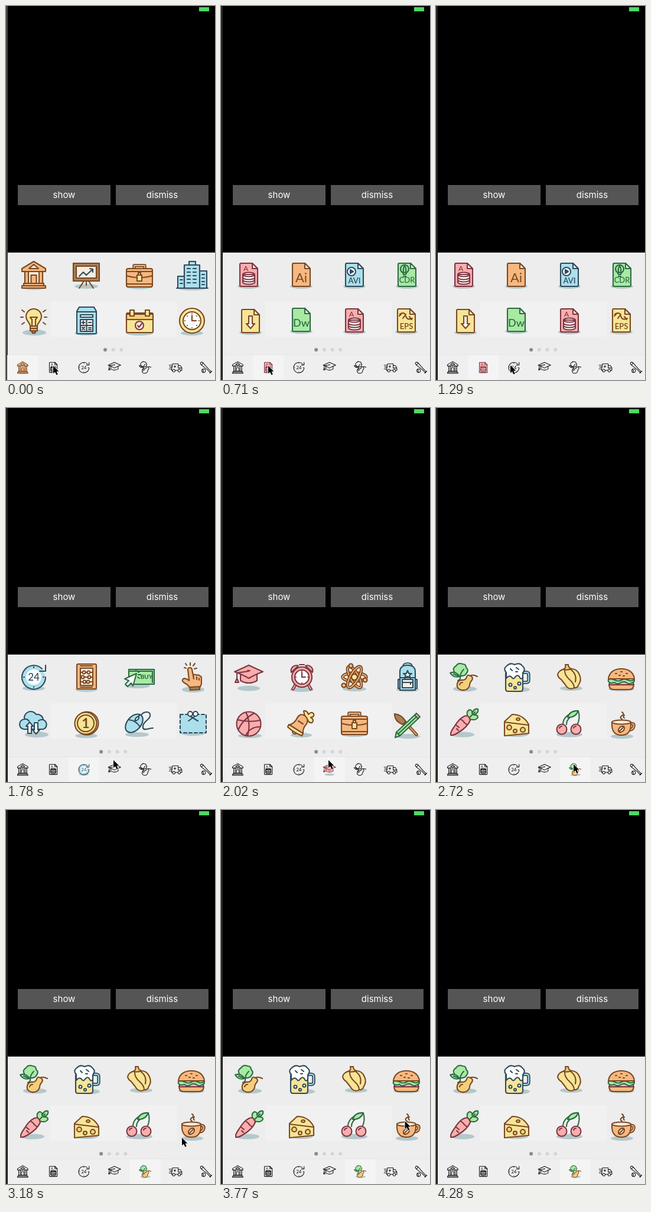
Animation of 354x631 px, one loop 4760 ms. Source, as an HTML page with a canvas:

```html
<!DOCTYPE html>
<html lang="en">
<head>
<meta charset="utf-8">
<title>Icon keyboard</title>
<style>
html, body { margin: 0; width: 100%; height: 100%; overflow: hidden; background: #000; }
canvas { display: block; width: 354px; height: 631px; }
</style>
</head>
<body>
<canvas id="stage"></canvas>
<script>
const LOOP = 4760, W = 354, H = 631;
const canvas = document.getElementById('stage'), g = canvas.getContext('2d');
const dpr = window.devicePixelRatio || 1;
canvas.width = W * dpr;
canvas.height = H * dpr;

const colors = {
  O: '#f6b880', Y: '#f6e596', A: '#abdfeb', R: '#f8aeac', E: '#a8eaa2', W: '#fdfdfd', L: '#f7ece0',
  T: '#a98058', G: '#f3cf7c', B: '#7a4822', N: '#2f4a5c', P: '#7c3542', D: '#2d6a45', K: '#111'
};

// Path helpers: ellipse, tilted ellipse, box
const oval = (x, y, r, q = r) => `M${x - r} ${y}a${r} ${q} 0 1 0 ${2 * r} 0a${r} ${q} 0 1 0 ${-2 * r} 0Z`;
const tilt = (x, y, r, q, deg) => {
  const a = deg * Math.PI / 180, u = r * Math.cos(a), v = r * Math.sin(a);
  return `M${x + u} ${y + v}A${r} ${q} ${deg} 1 0 ${x - u} ${y - v}A${r} ${q} ${deg} 1 0 ${x + u} ${y + v}Z`;
};
const box = (x, y, w, h) => `M${x} ${y}h${w}v${h}h${-w}Z`;

// An icon is [shadow, style, path, style, path, ...].
// Style: fill letter, stroke letter, optional mode (~ tube, . dashed, t text).
const page = 'M-13-20H6L15-11V17q0 2-2 2H-13q-2 0-2-2V-18q0-2 2-2Z';
const file = (fill, ink, ...parts) =>
  [[0, 19, 19, 4], fill + ink, page, 'L' + ink, 'M6-20V-11H15Z', ...parts];
const shift = (icon, dx, dy) => Object.assign([...icon], { dx, dy });

const database = file('R', 'P', '_Pt', ['A', -5, -7, 12, 500],
  'WP', 'M-10-1V12a10 3.5 0 0 0 20 0V-1Z' + oval(0, -1, 10, 3.5),
  '_P', 'M-10 4a10 3.5 0 0 0 20 0M-10 8a10 3.5 0 0 0 20 0');

const briefcase = [[0, 20, 22, 4],
  'OB~', 'M-9-10V-16H9V-10',
  'OB', 'M-19-11H19q3 0 3 3V17q0 3-3 3H-19q-3 0-3-3V-8q0-3 3-3Z',
  '_B', 'M-22-6H22M-22 1Q-12 4-4 4M22 1Q12 4 4 4M-22 15H22',
  'YB', box(-4, 0, 8, 10) + 'M-2 0V-4H2V0'];

const pages = [
  [
    [[0, 21, 20, 4],
      'LB', box(-15, -6, 30, 20), 'OB', box(-15, -6, 6, 20) + box(9, -6, 6, 20),
      'OB', box(-4.5, 0, 9, 14), 'OB', 'M0-23L-20-11V-6H20V-11Z', 'LB', 'M0-18L-8-11H8Z',
      'OB', box(-17, 14, 34, 4) + box(-20, 18, 40, 4)],
    [[0, 19, 20, 4],
      '_B', 'M-4 10L-12 22M4 10L12 22M0 10V17', 'TB', box(-22, -20, 44, 30), 'LB', box(-17, -15, 34, 20),
      '_N', 'M-12 2L-5-5L0 0L11-10M6-11L11-10V-5'],
    briefcase,
    [[0, 22, 25, 4],
      'AN', box(-24, 2, 11, 20) + box(13, -7, 12, 29), 'AN', box(-5, -23, 11, 6),
      'AN', box(-13, -17, 26, 39),
      '_N', [-11, -5, 1, 7, 13].map(y => `M-8 ${y}h5m5 0h5`).join('') +
        'M-20 8h4m-4 6h4M17-1h4m-4 6h4m-4 6h4m-4 5h4M-26 22H27'],
    [[1, 20, 20, 5],
      'YB', 'M-6 9C-6 4-13 0-13-7A13 13 0 0 1 13-7C13 0 6 4 6 9Z', 'OB', 'M-6 9H6V17H-6ZM-6 13H6',
      'TB', 'M-4 17h8l-2 4h-4Z', '_B', 'M-3 9V-2l-3-4h12l-3 4V9',
      '_B', 'M-22-6h4M18-6h4M-20-18l4 3M20-18l-4 3M-20 6l4-3M20 6l-4-3'],
    [[0, 21, 20, 4],
      'AN', 'M-12-23H13L17-16V20q0 2-2 2H-14q-2 0-2-2V-16Z', '_N', 'M-16-15H17', 'WN', box(-10, -10, 21, 4),
      'LN', box(-10, -2, 21, 20),
      '_N', 'M.5-2V18M-10 8H11M-7.500 3h5M-5 .5v5M4 3h4M-7 11l4 4m0-4l-4 4M4 12h4m-4 3h4'],
    [[0, 21, 23, 4],
      'YB', 'M-20-13H21q2 0 2 2V18q0 2-2 2H-20q-2 0-2-2V-11q0-2 2-2Z', 'GB', box(-22, -11, 45, 9),
      'YB', box(-16, -18, 7, 10) + box(10, -18, 7, 10), 'LP', oval(0, 8, 7), '_P', 'M-3 8l2 3 5-6'],
    [[0, 21, 19, 4],
      'YB', oval(0, 0, 21), 'WB', oval(0, 0, 15),
      '_B', 'M0-9V0H7M0-12v0M12 0v0M0 12v0M-12 0v0M8-8v0M8 8v0M-8 8v0M-8-8v0']
  ],
  [
    database,
    file('O', 'B', '_Bt', ['Ai', 0, 12, 22, 400]),
    file('A', 'N', 'WN', oval(-5, -6, 7), 'NN', 'M-7-9l5 3-5 3Z', '_Nt', ['AVI', 0, 14, 13, 600]),
    file('E', 'D', 'ED', 'M-7-4A7 7 0 1 1-1-4L-2-1H-6Z', '_D', 'M-4-16Q-8-9-5-4M-4-16Q0-9-3-4M-6 2H-2',
      '_Dt', ['CDR', 0, 13, 13, 500]),
    shift(file('Y', 'B', 'WB', 'M-3-9H3V4H7L0 12L-7 4H-3Z'), 3, 1),
    shift(file('E', 'D', '_Dt', ['Dw', 0, 11, 18, 500]), 0, -1),
    database,
    shift(file('Y', 'B', '_B', 'M-11-11Q-3-16-1-8T10-4M-12-8l4-4M-1-11l-5 7M5-7l4 5', '_Bt', ['EPS', 0, 14, 13, 600]), -1, 0)
  ],
  [
    [[0, 19, 19, 4],
      'AN', 'M20 0A20 20 0 1 1 14-14', 'W_', oval(0, 0, 13), '_N', 'M20-20V-10H10M0-17v1M0 16v1M-17 0h1M16 0h1',
      '_Nt', ['24', 0, 6, 17, 500]],
    [[0, 21, 19, 4],
      'OB', 'M-14-22H15q2 0 2 2V18q0 2-2 2H-14q-2 0-2-2V-20q0-2 2-2Z', 'LB', box(-10, -15, 21, 29),
      '_B', 'M-10-8H11M-10 0H11M-10 8H11M-10-19H10M-10 17H10',
      'LB', oval(-4, -8, 2.5) + oval(4, -8, 2.5) + oval(-6, 0, 2.5) + oval(5, 0, 2.5) + oval(-3, 8, 2.5) + oval(3, 8, 2.5)],
    [[-3, 15, 21, 4],
      'ED', box(-18, -13, 43, 25), '_D', 'M-16-10H22V9',
      'WD', 'M-5-6L-25 3L-18 6L-24 12L-20 16L-14 10L-11 15Z',
      '_D', 'M-5-10l-1-1M-2-8l3-2M-2-4h4M-3 0l3 2', '_Dt', ['BUY', 12, 3, 10, 800]],
    [[2, 21, 19, 5],
      '_B', 'M-10-15l-3-1M-9-20l-2-3M-3-20v-4M2-19l3-4M4-14l4-1',
      'OB', 'M-5 4L-7-12a3.500 3.500 0 0 1 7-1L2-3q3-3 6 0 3-2 5 1 3 0 3 4V11Q15 15 13 18H-3Q-8 12-14 9q-4-3-1-6 4-2 10 3Z',
      '_B', 'M2-3L3 3M8 0V4M12 2V5', 'TB', 'M-4 17L13 16V21L-3 22Z'],
    [[5, 20, 20, 5],
      'AN', 'M-15 11a8.500 8.500 0 0 1-1-17A11 11 0 0 1 4-14A10 10 0 0 1 16-5A8.500 8.500 0 0 1 16 11Z',
      '_N', 'M-16-6q5-1 8 3M15-5q-4-1-7 2',
      'WN', 'M-7-1l6 7h-3v12h-6V6h-3Z', 'WN', 'M4 19l-6-7h3V0h6v12h3Z'],
    [[0, 22, 19, 4],
      'OB', oval(1, 1, 19.500), 'YB', oval(-1, 1, 18.500), 'YB', oval(-1, 1, 14), '_Bt', ['1', -1, 9, 23, 700]],
    [[-4, 20, 20, 4],
      '_N', 'M3-13C8-20 20-20 18-11C16-4 4-1 6 9C8 14 16 9 23 9',
      'AN', tilt(-9, 1, 18, 11.5, -48), '_N', 'M-18-5Q-6-4 1 7M-8-3L1-14', 'WN', tilt(-4, -7, 4, 2, -48)],
    shift([[0, 18, 20, 4],
      'AN.', box(-22, -14, 44, 31), '_N', 'M-5-11L8-3M3-11L-8-3', 'WN', oval(-5, -15, 4) + oval(4, -15, 4)], 2, 0)
  ],
  [
    [[0, 19, 19, 4.5],
      'RP', 'M-14-5V6Q0 14 14 6V-5Z', 'RP', 'M0-20L24-9Q10-4 0 2Q-10-4-24-9Z',
      '_P', 'M0-10L-20-7V3M-2-11h4', 'RP', 'M-20 2l-3 7h6Z'],
    [[1, 21, 20, 4],
      'RP', 'M-17-8A9 9 0 0 1-5-19ZM19-8A9 9 0 0 0 7-19Z', 'RP~', 'M-10 13l-4 7M12 13l4 7',
      'RP', oval(1, 0, 17), 'WP', oval(1, 0, 12), '_P', 'M1-8V0H7M1-10v0M1 10v0M-9 0v0M11 0v0M-3-21H5'],
    [[0, 20, 20, 4],
      'OB~', tilt(0, 0, 20, 7, 0), 'OB~', tilt(0, 0, 20, 7, 60), 'OB~', tilt(0, 0, 20, 7, 120),
      'YB', oval(0, 0, 5), 'OB', oval(-6, -19, 3.5) + oval(18, 5, 3.5) + oval(-18, 14, 3.5)],
    [[1, 21, 19, 4],
      'AN~', 'M-5-18q0-4 6-4t6 4', 'AN', box(-15, 4, 32, 15),
      'AN', 'M-12 22V-9Q-12-20 1-20T14-9V22Z', 'LN', 'M-8 4H10V18H-8Z', '_N', 'M-12 1H14M-8 9H10M6 9v3',
      'WN', 'M1-11l2 5h5l-4 3 2 5-5-3-5 3 2-5-4-3h5Z'],
    [[2, 22, 20, 4],
      'RP', oval(0, 2, 20.500), '_P', 'M-19-5Q0 0 19-4M-5-18Q4 0-2 22M-18 12Q-10-6 9-16M-5 21Q3 6 20 7'],
    [[0, 21, 18, 4],
      'YB', 'M6-10L4-20Q10-21 12-14Q18-20 21-15Q23-10 16-9Q23-5 18 0Q13 1 10-6Z',
      'GB', oval(-11, 15, 4), 'OB', 'M-21 4Q-11 1-7-8Q-2-17 6-12Q13-6 9 2Q2 9 3 18Q-2 22-13 13T-21 4Z',
      'YB', 'M-21 3L3 18L1 22Q-14 16-23 7Z', '_B', 'M-5-3L3 2'],
    briefcase,
    [[2, 23, 20, 4],
      'OB~', 'M16 20L-4-2', 'TB', 'M-7 3Q-21-2-21-15Q-9-14-2-2Z',
      'ED', 'M13-13l6 6L-12 22L-20 25L-18 16Z', '_D', 'M16-10L-15 19M-18 16l6 6', 'RD', 'M13-13l3-3 6 6-3 3Z']
  ],
  [
    [[2, 20, 20, 4.500],
      'ED', 'M-6-2Q-17-2-16-9Q-20-15-13-19Q-9-25-2-22Q4-22 4-16Q9-12 5-7Q2-1-6-2Z',
      'ED', 'M-7-1Q-17 2-23-7Q-14-11-7-1Z', '_D', 'M0-13Q-6-7-6 0Q-5 4-10 6M-7-1L-17-5',
      'GB', 'M9-3Q17-1 14 5Q10 9 10 14Q7 23-3 22Q-13 20-11 11Q-9 4-1 5Q4 4 5 0Q6-4 9-3Z',
      '_B', 'M11-2Q15-5 23-1M-7 13q1-4 5-4'],
    [[3, 21, 20, 4.500],
      'AN~', 'M11-8H17q4 0 4 4V5q0 4-4 4H11', 'YN', 'M-18-7H11V20q0 4-4 4H-14q-4 0-4-4Z',
      'WN', 'M-17 2V-8Q-23-14-16-19Q-10-25-3-21Q6-25 10-19Q17-14 11-7V1Q7 5 5-1Q2-5-2 0Q-5 5-8 0Q-12-4-17 2Z',
      '_N', 'M-10-14l3 3M0-16l4 3M-1-9h3', 'WN', oval(-10, 13, 2.500) + oval(-2, 18, 2) + oval(5, 11, 2.500)],
    [[3, 19, 19, 4],
      'YB', 'M-8-14Q-19-11-20-4Q-19 1-14 4Q-9 10-4 17Q2 22 8 18Q14 19 16 12Q21 5 17-4Q13-14 3-14Q-2-17-8-14Z',
      '_B', 'M-8-11Q-8-3 0 4T8 18M2-13Q13-5 10 8', 'GB', 'M-10-13Q-5-16-7-21L-2-21Q-2-16 3-14Q-4-11-10-13Z'],
    shift([[0, 18, 22, 4],
      'OB', 'M-21 10H21Q21 19 13 19H-13Q-21 19-21 10Z', 'RP', 'M-20 6H20V11H-20Z',
      'ED', 'M-22 2Q-17 0-11 3T0 3T11 3T22 2Q23 7 17 8Q13 11 8 7Q3 4-2 8Q-7 11-12 7Q-17 9-20 7Q-23 6-22 2Z',
      'OB', 'M-22 1C-21-10-12-16 0-16S21-10 22 1Z', '_B', 'M-10-8h2M-1-11h2M8-8h2M-4-5h2M3-4h2'], -1, 2),
    [[-2, 20, 20, 4.500],
      'ED', 'M7-10Q3-19 10-22Q15-21 14-16Q18-25 24-23Q26-17 17-13Q24-14 24-9Q20-3 11-6Z', '_D', 'M9-8L19-18',
      'RP', 'M1-11Q9-14 11-4Q6 8-10 17Q-18 22-22 21Q-23 16-17 8Q-8-7 1-11Z',
      '_P', 'M-5-6l5 4M5 3l-5-4M-13 4l5 4M-9 13l-3-3'],
    [[0, 20, 20, 4],
      'YB', 'M-20-2L-7-14Q12-14 21 3V18L-20 22Z', '_B', 'M-20-1L21 4',
      'GB', oval(-12, 8, 4) + oval(-2, 14, 3) + oval(11, 12, 4) + oval(3, -6, 3, 2)],
    [[0, 20, 22, 4.500],
      '_D', 'M-11 3Q-11-14 15-20Q19-8 13 4M-5 3Q-5-9 11-14', 'ED', 'M15-20Q1-21-3-9Q10-8 15-20Z',
      'RP', oval(-13, 11, 8.500), 'RP', oval(11, 11, 8.500), '_P', 'M-17 9q1-3 4-3M7 9q1-3 4-3'],
    [[0, 23, 19, 4],
      '_B', 'M0-6Q-5-9 0-12T0-18M4-8Q1-10 4-13', 'OB~', 'M14 2Q21 0 20 6T11 12',
      'OB', 'M-17-1V5Q-16 21-1 21T15 5V-1Z', 'LB', oval(-1, -1, 16, 3.5),
      'LB', tilt(-1, 11, 6, 4, -45), '_B', 'M-4 14L2 8']
  ]
];

const ambulance = [null,
  'WK', 'M-12-14H10V-8H18L24 1V11H-16Z', '_K', 'M10-8V2H23M-25-9h10M-23-2h9M-25 5h9M-3-8v8M-7-4h8',
  'WK', oval(-7, 12, 5) + oval(14, 12, 5)];
const bat = [null,
  'WK', 'M-22-18q4-5 9-1L8 5L19 15l-4 4L5 9L-19-10q-5-4-3-8Z', '_K', 'M14 22L22 14M-12-17L-18-10', 'WK', oval(-10, 12, 7),
  '_K', 'M-14 8q5 3 2 10'];
const tabs = [...pages.map(p => p[0]), ambulance, bat];

function drawIcon(icon, x, y, scale = 1, mono = false) {
  const [shadow, ...parts] = icon;
  g.save();
  g.translate(x + (icon.dx || 0) * scale, y + (icon.dy || 0) * scale);
  g.scale(scale, scale);
  g.lineJoin = g.lineCap = 'round';
  if (shadow && !mono) {
    g.fillStyle = '#b4c8cb';
    g.fill(new Path2D(oval(...shadow)));
  }
  const width = scale < 1 ? 2.4 : 2.1;
  for (let i = 0; i < parts.length; i += 2) {
    const [f, s, mode] = parts[i], data = parts[i + 1];
    const fill = mono ? '#efefef' : colors[f], ink = mono ? '#111' : colors[s];
    if (mode === 't') {
      text(data[0], data[1], data[2], `${data[4]} ${data[3]}px Lato, sans-serif`, ink);
      continue;
    }
    const path = new Path2D(data);
    g.strokeStyle = ink;
    g.lineWidth = mode === '~' ? 5.4 : width;
    g.setLineDash(mode === '.' ? [5, 4] : []);
    if (f !== '_' && mode !== '~') { g.fillStyle = fill; g.fill(path); }
    if (s !== '_') g.stroke(path);
    if (mode === '~') { g.strokeStyle = fill; g.lineWidth = 1.8; g.stroke(path); }
  }
  g.restore();
}

function rect(color, x, y, w, h) {
  g.fillStyle = color;
  g.fillRect(x, y, w, h);
}

function text(str, x, y, font, color) {
  g.font = font;
  g.textAlign = 'center';
  g.fillStyle = color;
  g.fillText(str, x, y);
}

function button(label, x) {
  rect('#555', x, 302, 157, 34);
  text(label, x + 78.5, 324, '15px Inter, sans-serif', '#fff');
}

// Pointer moves: start, end, number of steps, then the points passed
const moves = [
  [710, 1290, 10, [80, 607], [126, 606]],
  [1490, 1780, 6, [126, 606], [182, 594]],
  [2020, 2310, 7, [182, 594], [231, 602]],
  [2610, 3130, 10, [231, 602], [291, 571]],
  [3180, 3410, 5, [298, 553], [302, 529], [295, 541]],
  [3650, 3940, 7, [295, 541], [327, 510], [316, 529]],
  [4110, 4280, 4, [316, 529], [302, 640]]
];

function pointer(t) {
  const move = moves.filter(m => m[0] <= t).pop() || moves[0];
  const [start, end, steps, ...pts] = move;
  const step = Math.floor(Math.max(0, t - start) / (end - start) * (steps - 1) + 1e-6);
  const k = Math.min(1, step / (steps - 1));
  const u = k * k * (3 - 2 * k) * (pts.length - 1);
  const i = Math.min(Math.floor(u), pts.length - 2), f = u - i;
  return pts[i].map((v, n) => v + (pts[i + 1][n] - v) * f);
}

function drawPointer([x, y]) {
  g.save();
  g.translate(x, y);
  const arrow = new Path2D('M0 0V13L3 10.500L5.500 15.500L7.800 14.500L5.500 9.500H9.500Z');
  g.lineJoin = 'round';
  g.lineWidth = 1.6;
  g.strokeStyle = '#fff';
  g.stroke(arrow);
  g.fillStyle = '#000';
  g.fill(arrow);
  g.restore();
}

const taps = [710, 1490, 2020, 2610];

function draw(t) {
  const current = taps.filter(at => t >= at).length;
  g.setTransform(dpr, 0, 0, dpr, 0, 0);
  rect('#000', 0, 0, W, H);
  rect(current ? '#222' : '#424242', 0, 0, 3, H);
  rect('#4cd964', 327, 2, 17, 7);
  button('show', 20);
  button('dismiss', 186);

  rect('#ededed', 3, 416, W - 3, H - 416);
  rect('#f1f1f1', 75, 498, 214, 60);
  pages[current].forEach((icon, i) =>
    drawIcon(icon, [47, 136, 226, 315][i % 4], i < 4 ? 454 : 531));

  const dots = current ? 4 : 3;
  for (let i = 0; i < dots; i++) {
    g.fillStyle = i ? '#d5d5d5' : '#8a8a8a';
    g.fill(new Path2D(oval(181.7 + (i - (dots - 1) / 2) * 13.7, 580, 3)));
  }

  rect('#efefef', 3, 588, W - 3, H - 588);
  rect('#e5e5e5', 3, 588, W - 3, 1);
  rect('#f4f4f4', 2 + current * 52, 589, 52, H - 589);
  tabs.forEach((icon, i) => drawIcon(icon, 28.3 + i * 51.8, 610, 0.44, i !== current));
  if (t < 4280) drawPointer(pointer(t));
}

const begin = performance.now();
function tick() {
  draw((performance.now() - begin) % LOOP);
  requestAnimationFrame(tick);
}
tick();
</script>
</body>
</html>
```
